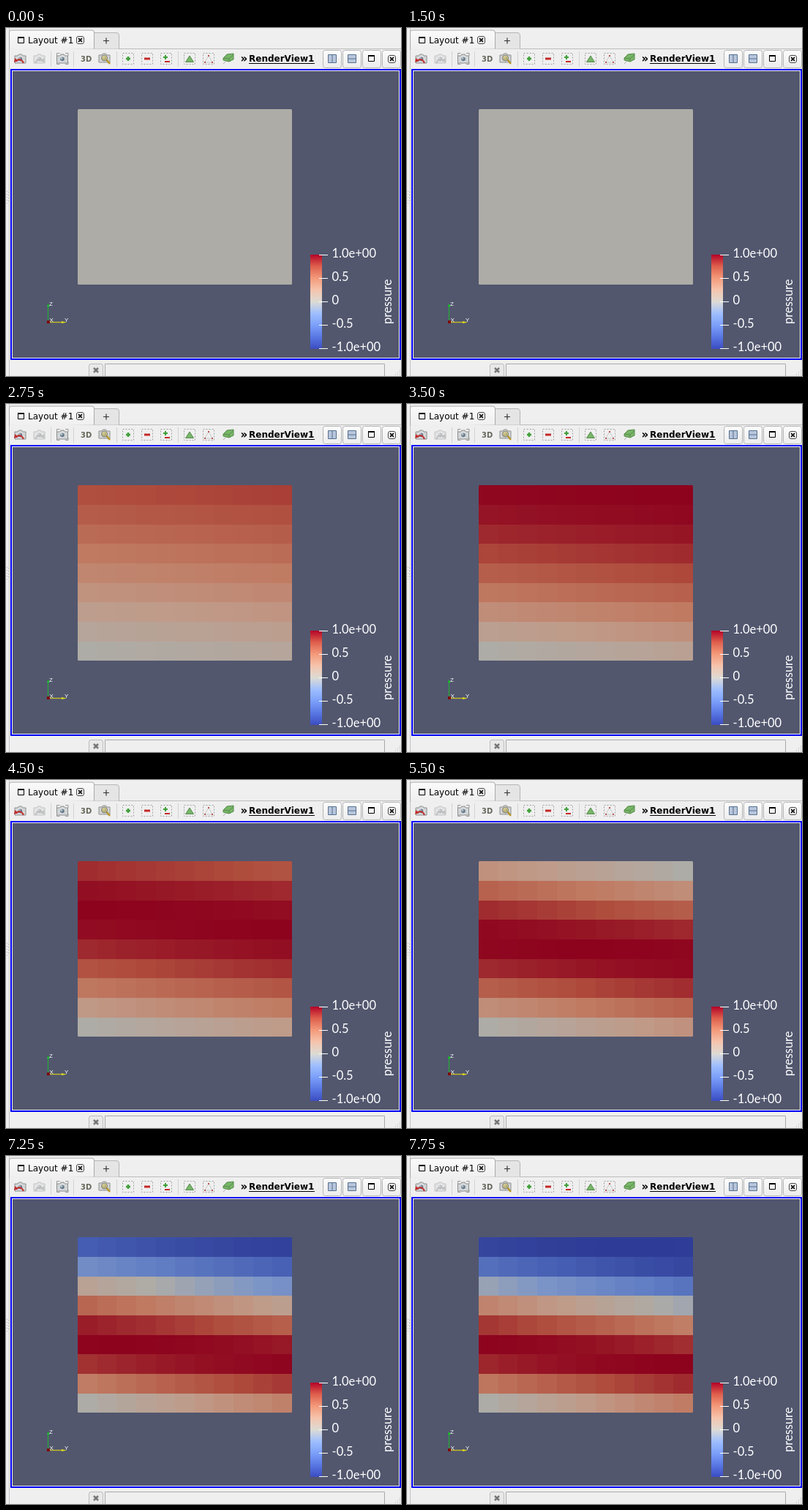
Recreate the animation shown at these times as an HTML page. Size 540 by 476 pixels, loop 8000 ms.

```html
<!DOCTYPE html>
<html lang="en">
<head>
<meta charset="utf-8">
<title>Pressure render view</title>
<style>
  html, body { margin: 0; width: 100%; height: 100%; overflow: hidden; background: #efefef; }
  svg { display: block; width: 540px; height: 476px; }
  .ui { font-family: "DejaVu Sans", sans-serif; font-size: 12px; fill: #000; }
  .bold { font-weight: bold; }
  .legend { font-family: Lato, sans-serif; font-size: 16.5px; fill: #fff; }
  .axis { font-family: "Liberation Sans", sans-serif; font-size: 8px; fill: #fff; }
</style>
</head>
<body>
<svg viewBox="0 0 540 476">
  <defs>
    <linearGradient id="tabFill" x2="0" y2="1"><stop stop-color="#fafafa"/><stop offset="1" stop-color="#efefef"/></linearGradient>
    <linearGradient id="buttonFill" x2="0" y2="1"><stop stop-color="#fdfdfd"/><stop offset="1" stop-color="#ececec"/></linearGradient>
    <linearGradient id="barFill" x2="0" y1="1" y2="0"></linearGradient>
    <clipPath id="boxClip"><rect x="98" y="111" width="293" height="240" rx="1.500"/></clipPath>
    <g id="camera">
      <path d="M1 5h4l1.5-2h4L12 5h4v10H1z" fill="#d3d5d6" stroke="#8b8f90"/>
      <circle cx="8.5" cy="9.5" r="3.6" fill="#6e8190" stroke="#eee"/>
      <circle cx="7.5" cy="8.5" r="1.2" fill="#b8ccd8"/>
    </g>
    <rect id="selection" x=".5" y=".5" width="15" height="15" fill="none" stroke="#a2a2a2" stroke-dasharray="2 2"/>
    <g id="closeMark">
      <rect x=".5" y=".5" width="10" height="10" rx="2.5" fill="#fafafa" stroke="#444"/>
      <path d="M3 3l5 5M8 3l-5 5" stroke="#222" stroke-width="1.8"/>
    </g>
    <g id="windowMark" fill="none" stroke="#000"><path d="M.5 1v7.500h8V1"/><path d="M0 1h9" stroke-width="2"/></g>
  </defs>

  <rect width="540" height="476" fill="#efefef"/>
  <path d="M4.500 0V476" stroke="#c4c4c4"/>
  <path d="M1.500 223V240M3.500 224V240" stroke="#b5b5b5" stroke-dasharray="1 3"/>

  <!-- tabs -->
  <path d="M4 28.500H540" stroke="#bcbcbc"/>
  <path d="M120.500 28.500V6.500H151q3.500 0 3.500 3V28.500" fill="#e5e5e5" stroke="#b5b5b5"/>
  <path d="M4.500 30V6q0-3 3-3H117q3.500 0 3.500 3V28.500" fill="url(#tabFill)" stroke="#aaa"/>
  <use href="#windowMark" x="16" y="12"/>
  <text class="ui" x="30" y="21">Layout #1</text>
  <use href="#closeMark" x="96" y="11"/>
  <path d="M133 17.500h8M137 13.500v8" stroke="#333" stroke-width="1.200"/>

  <!-- toolbar -->
  <path d="M61.500 32V53M92.500 32V53M151.500 32V53M235.500 32V53" stroke="#d2d2d2"/>
  <use href="#camera" x="11" y="33"/>
  <path d="M14 45q6-5 10 3" fill="none" stroke="#c03030" stroke-width="2"/>
  <path d="M11 47l1-6 5 4z" fill="#c03030"/>
  <g opacity=".45">
    <use href="#camera" x="37" y="33"/>
    <path d="M40 48q4-8 10-3" fill="none" stroke="#888" stroke-width="2"/>
    <path d="M53 47l-1-6-5 4z" fill="#888"/>
  </g>
  <use href="#camera" x="68.500" y="33"/>
  <path d="M69.500 38v-3.500h4M81 34.500h4v3.500M69.500 46v3.500h4M81 49.500h4v-3.500" fill="none" stroke="#999"/>
  <text class="ui bold" x="102" y="46" style="font-size:10px;fill:#66685c">3D</text>
  <use href="#camera" x="126" y="32"/>
  <path d="M137 43l5 6" stroke="#b8962a" stroke-width="2.500"/>
  <circle cx="134.500" cy="41" r="4" fill="#e8d36b" fill-opacity=".6" stroke="#777"/>

  <use href="#selection" x="159" y="34"/>
  <path d="M164 42h6M167 39v6" stroke="#3f9f38" stroke-width="2.500"/>
  <use href="#selection" x="185" y="34"/>
  <path d="M189 42h8" stroke="#c52a2a" stroke-width="3"/>
  <use href="#selection" x="211" y="34"/>
  <path d="M215 40h6M218 37v6" stroke="#3f9f38" stroke-width="2"/>
  <path d="M217 46h7" stroke="#c52a2a" stroke-width="2"/>
  <use href="#selection" x="243" y="34"/>
  <path d="M251 38l5.500 8.500h-11z" fill="#79b56b" stroke="#568c4a"/>
  <use href="#selection" x="269" y="34"/>
  <path d="M277 38l5.500 9h-11z" fill="none" stroke="#c8c8c8"/>
  <path d="M276 37h2v2h-2zM271 46h2v2h-2zM281 46h2v2h-2z" fill="#b55"/>
  <path d="M297 41l5-5 9-1v8l-6 3-8-2z" fill="#78b568" stroke="#568c4a"/>
  <path d="M297 41l8 1 6-6M305 42v4" fill="none" stroke="#568c4a"/>
  <path d="M297 49l4-4" stroke="#aaa"/>
  <text class="ui bold" x="320.500" y="47" style="font-size:15px">»</text>
  <text class="ui bold" x="332" y="46">RenderView1</text>
  <path d="M332 48.500H422" stroke="#000"/>
  <g id="viewButtons"></g>
  <path d="M440.500 36.500h11v11h-11zM446 36.500v11M467.500 36.500h11v11h-11zM467.500 42h11" fill="#b8c6dc" stroke="#56708f"/>
  <use href="#windowMark" x="495" y="37"/>
  <use href="#closeMark" x="522" y="37"/>

  <!-- render view -->
  <rect x="7" y="57" width="532" height="396" fill="#52576e" stroke="#0000f5" stroke-width="2"/>
  <rect x="8.500" y="58.500" width="529" height="393" fill="none" stroke="#f2f2f2"/>
  <g clip-path="url(#boxClip)"><g id="cells" shape-rendering="crispEdges"></g></g>

  <path d="M57.500 400V379" stroke="#1fb52f"/>
  <path d="M56 381l1.500-4 2 4z" fill="#10d020"/>
  <path d="M59 402.500H77" stroke="#c9c020" stroke-width="1.300"/>
  <path d="M76 401l7 1.500-7 1.500z" fill="#e0d820"/>
  <rect x="56" y="400" width="4" height="4" fill="#7c0808"/>
  <g class="axis"><text x="59" y="380">Z</text><text x="59.500" y="402">X</text><text x="80" y="402">Y</text></g>

  <rect x="416" y="310" width="16" height="129" fill="url(#barFill)"/>
  <g id="legend" class="legend"></g>
  <text class="legend" transform="translate(527 405) rotate(-90)">pressure</text>

  <!-- status bar -->
  <path d="M113.500 477V462q0-2.500 2.500-2.500h14q2.500 0 2.500 2.500V477" fill="#e9e9e9" stroke="#bdbdbd"/>
  <path d="M120 465l6 6M126 465l-6 6" stroke="#777" stroke-width="2.500"/>
  <path d="M135.500 477V459.500H517.500V477" fill="#efefef" stroke="#aaa"/>
  <path d="M538 468h1M535 471h4M532 474h7" stroke="#aaa" stroke-dasharray="1 2"/>
</svg>
<script>
const SVG = "http://www.w3.org/2000/svg";
const LOOP = 8000;
const COLUMNS = 11, ROWS = 9;
const BOX = { x: 98, y: 111, width: 293, height: 240 };

// Diverging blue-to-red map, evenly spaced from -1 to 1.
const COOL_WARM = [
  [59, 76, 192], [88, 119, 227], [123, 159, 249], [158, 190, 254], [221, 219, 212],
  [245, 196, 173], [244, 154, 123], [222, 96, 77], [180, 4, 38]
];
const LIGHT = 0.785;

// The simulation advances in fixed steps; the view refreshes at these times.
const SIMULATION_START = 1500, STEP_MS = 500 / 3, FREQUENCY_STEP = 0.004 / 3;
const REFRESHES = [2000, 2250, 2500, 2750, 3000, 3250, 3500, 4000, 4500, 4750,
  5000, 5500, 5750, 6000, 6500, 7000, 7250, 7500, 7750];

function add(parent, tag, attributes, text = "") {
  const node = document.createElementNS(SVG, tag);
  for (const [key, value] of Object.entries(attributes)) node.setAttribute(key, value);
  node.textContent = text;
  return parent.appendChild(node);
}

const byId = id => document.getElementById(id);

function colour(value, light = 1) {
  const position = (value + 1) / 2 * (COOL_WARM.length - 1);
  const low = Math.min(Math.floor(position), COOL_WARM.length - 2);
  const mix = position - low;
  const rgb = COOL_WARM[low].map((v, i) => Math.round(light * (v + (COOL_WARM[low + 1][i] - v) * mix)));
  return `rgb(${rgb})`;
}

for (let i = 0; i < 4; i++) {
  add(byId("viewButtons"), "rect", {
    x: 433.5 + 27 * i, y: 30.5, width: 25, height: 24, rx: 3, fill: "url(#buttonFill)", stroke: "#b4b4b4"
  });
}

for (let i = 0; i <= 32; i++) {
  add(byId("barFill"), "stop", { offset: i / 32, "stop-color": colour(i / 16 - 1) });
}

["1.0e+00", "0.5", "0", "-0.5", "-1.0e+00"].forEach((label, i) => {
  const y = 310.5 + 32 * i;
  add(byId("legend"), "path", { d: `M428 ${y}h12`, stroke: "#fff" });
  add(byId("legend"), "text", { x: 445.5, y: y + 3.5 }, label);
});

// Cells are numbered from the bottom left, row by row.
const columnEdge = column => Math.round(BOX.x + column * BOX.width / COLUMNS);
const rowEdge = row => Math.ceil(BOX.y + (ROWS - row) * BOX.height / ROWS);
const cells = Array.from({ length: COLUMNS * ROWS }, (_, index) => {
  const column = index % COLUMNS, row = Math.floor(index / COLUMNS);
  const x = columnEdge(column), y = rowEdge(row + 1);
  return add(byId("cells"), "rect", { x, y, width: columnEdge(column + 1) - x, height: rowEdge(row) - y });
});

let shown = null;

function draw(time) {
  const refreshed = REFRESHES.findLast(refresh => refresh <= time) ?? SIMULATION_START;
  if (refreshed === shown) return;
  shown = refreshed;
  const step = Math.floor((refreshed - SIMULATION_START) / STEP_MS + 1e-6);
  const frequency = step * FREQUENCY_STEP;
  cells.forEach((cell, index) => cell.setAttribute("fill", colour(Math.sin(index * frequency), LIGHT)));
}

const start = performance.now();
function tick() {
  draw((performance.now() - start) % LOOP);
  requestAnimationFrame(tick);
}
tick();
</script>
</body>
</html>
```
